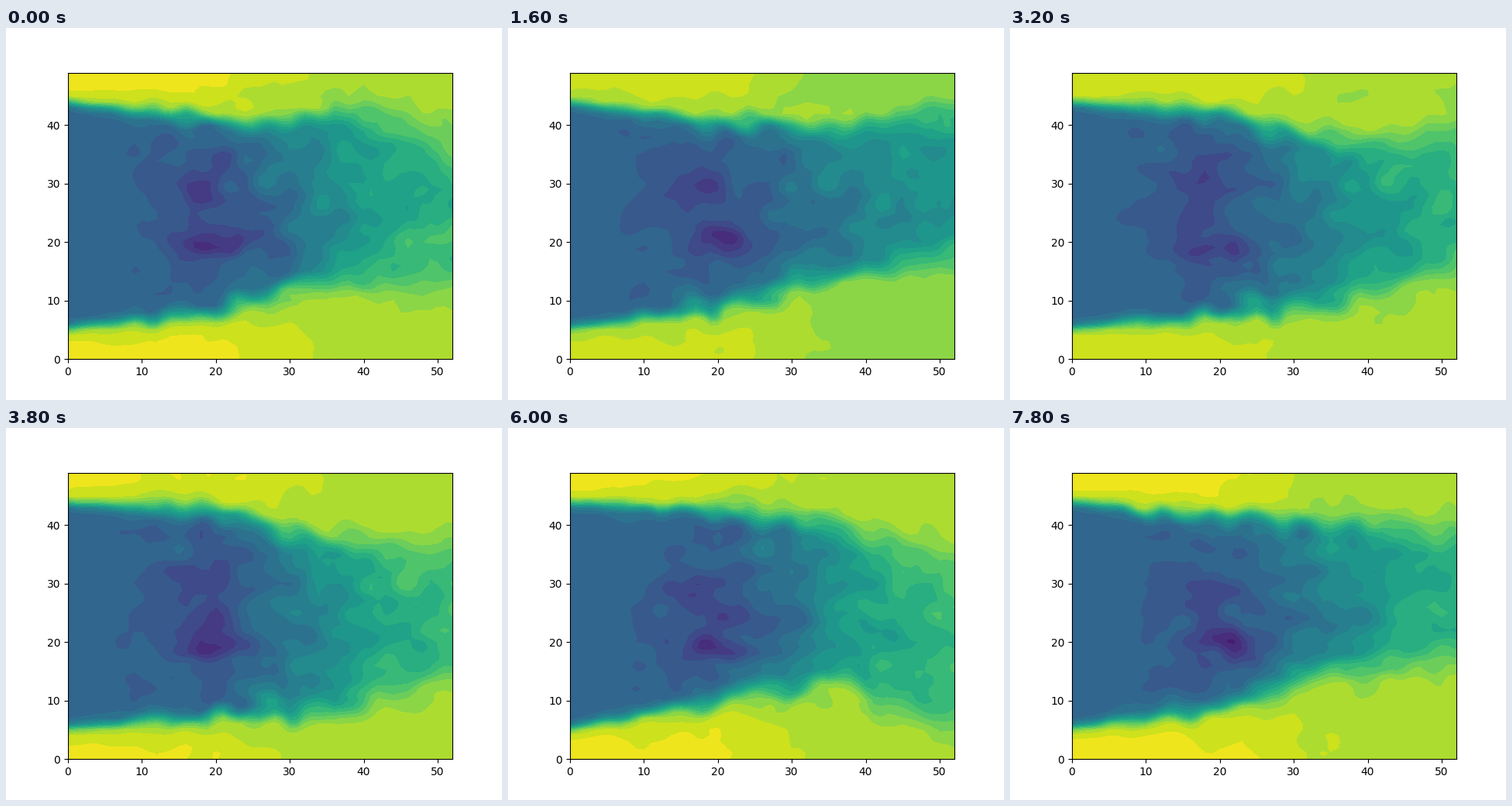
These frames come from a looping animation (640x480 px, 8000 ms). A matplotlib script:

```python
import numpy as np
import matplotlib.pyplot as plt
from matplotlib.animation import FuncAnimation

NX, NY, FRAMES = 53, 50, 40
X, Y = np.meshgrid(np.arange(NX), np.arange(NY))
RIM = 0.84          # value where the free stream meets the shear layer
LEVELS = np.linspace(0, 1, 21)

# The wake meanders: height of each shear layer at three stations over time.
KEYS = [0, 8, 12, 19, 24, 30, 39]
STATIONS = [0, 20, 36, 52]
LOWER = [[8.5, 9.3, 8.2, 8.0, 9.6, 10.5, 9.3],
         [13.5, 14.5, 12.3, 8.8, 8.5, 14.0, 15.5],
         [13.5, 17.5, 18.0, 15.0, 10.5, 5.5, 18.0]]
UPPER = [[40.5, 40.0, 41.0, 42.0, 41.5, 42.3, 41.0],
         [42.0, 40.0, 36.5, 36.0, 37.5, 39.2, 39.8],
         [38.0, 41.5, 42.0, 36.0, 36.0, 32.5, 37.8]]
STREAM = [.965, .915, .925, .96, .96, .965, .97]    # free stream at the inlet
FAR = [.64, .50, .57, .67, .61, .66, .60]           # wake core at the outlet


def track(values, i):
    return np.interp(i, KEYS, values)


def ramp(x, start, end):
    s = np.clip((x - start) / (end - start), 0, 1)
    return s * s * (3 - 2 * s)


def noise(seed, passes):
    """Smoothed unit-variance noise, long enough to slide past the window."""
    n = np.random.default_rng(seed).normal(size=(NY, NX + FRAMES))
    for _ in range(passes):
        for axis in (0, 1):
            n = (np.roll(n, 1, axis) + 2 * n + np.roll(n, -1, axis)) / 4
    return n / n.std()


FINE, COARSE = noise(3, 1), noise(8, 5)
WARP_X, WARP_Y = noise(15, 2), noise(21, 2)


def eddy(xx, yy, x, y, rx, ry):
    return np.exp(-((xx - x) / rx) ** 2 - ((yy - y) / ry) ** 2)


def layer(inlet, rows, i):
    return np.interp(X, STATIONS, [inlet] + [track(r, i) for r in rows])


def field(i):
    # Turbulence is carried downstream one cell per step and grows with x.
    fine, coarse, wx, wy = (n[:, FRAMES - i:FRAMES - i + NX]
                            for n in (FINE, COARSE, WARP_X, WARP_Y))
    grow = .08 + .92 * ramp(X, 0, 24)
    xx = X + .8 * grow * wx
    yy = Y + .65 * grow * wy

    depth = np.minimum(yy - layer(5.4, LOWER, i), layer(43.8, UPPER, i) - yy)
    depth = depth / (.7 + .055 * X)

    core = .32 + (track(FAR, i) - .32) * ramp(xx, 20, 52)
    core -= .06 * eddy(xx, yy, 19, 25, 9, 13)
    core -= .12 * eddy(xx, yy, 20, 19.5 + np.sin(i / 3), 4, 2.6)
    core -= .08 * eddy(xx, yy, 17, 29.5 - np.sin(i / 4), 4.5, 3)

    stream = track(STREAM, i) - .08 * ramp(xx, 18, 38)
    outside = RIM + (stream - RIM) * (1 - np.exp(np.minimum(depth + 1, 0)))
    mix = np.interp(depth, [-1, 0, 1, 3], [1, .5, .1, 0])
    v = mix * outside + (1 - mix) * core

    rough = .018 * fine + .024 * coarse
    v += grow * rough * (1 - mix) + (.004 + .007 * grow) * mix * (fine + coarse) / 2
    return np.clip(v, .012, .99)


fig, ax = plt.subplots(figsize=(6.4, 4.8), dpi=100)


def draw(i):
    ax.clear()
    ax.contourf(field(i), levels=LEVELS, cmap="viridis")


anim = FuncAnimation(fig, draw, frames=FRAMES, interval=200,
                     init_func=lambda: None, repeat=True, repeat_delay=0)
plt.show()
```
